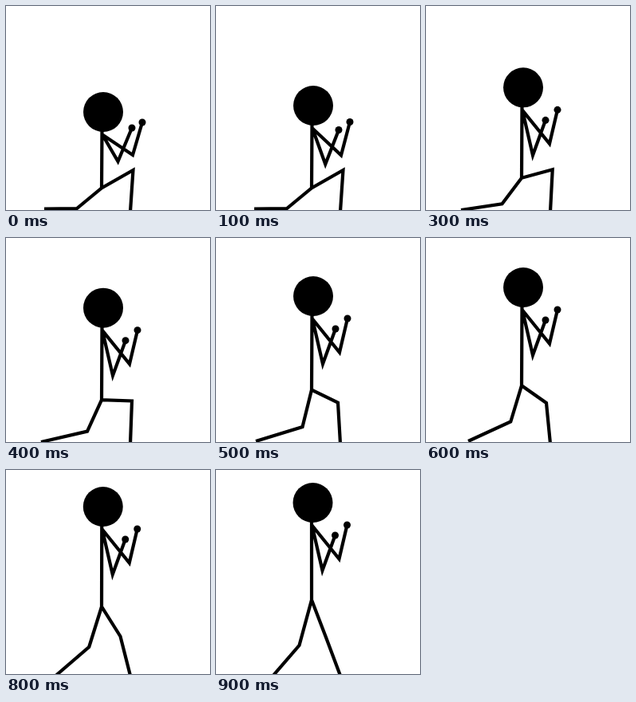
Recreate the animation shown at these times as an HTML page. Size 256x256 px, loop 1 s.

```html
<!DOCTYPE html>
<html lang="en">
<head>
<meta charset="utf-8">
<title>Rising stick figure</title>
<style>
  html, body { margin: 0; width: 100%; height: 100%; overflow: hidden; background: #fff; }
  svg { display: block; width: 100vw; height: 100vh; }
  path { fill: none; stroke: #000; stroke-width: 4.2; stroke-miterlimit: 6; }
</style>
</head>
<body>
<svg viewBox="0 0 256 256">
  <path id="limbs"/>
  <circle id="head" r="25"/>
  <circle id="near" r="4.5"/>
  <circle id="far" r="4.5"/>
</svg>
<script>
const STEP = 100, STEPS = 10;

// Key points of each joint: [step, x, y], linear in between, held outside.
const joints = {
  head: [[0, 122, 133], [2, 122, 117], [5, 122, 73], [7, 122, 51], [9, 121.5, 41]],
  hip: [[2, 120, 228.5], [5, 120, 190.5], [7, 120, 180], [9, 120, 163]],
  frontKnee: [[2, 159.5, 206], [4, 158, 204.5], [5, 153, 206.5], [7, 149, 207.5], [9, 138, 210]],
  backKnee: [[2, 89, 254], [5, 108.5, 237], [7, 104, 224], [9, 104.5, 220]],
  backFoot: [[2, 48, 254.5], [3, 44, 256], [4, 44, 256], [5, 50, 255], [7, 56, 255], [9, 70, 260]]
};

// Arm joints, relative to the head: raised at first, then on guard.
const arms = {
  nearElbow: [[0, 37, 54], [2, 33, 70.5]],
  nearHand: [[0, 49, 13], [2, 43, 28]],
  farElbow: [[0, 18.5, 62], [2, 12, 85]],
  farHand: [[0, 36, 20], [2, 28, 41]]
};

const $ = id => document.getElementById(id);
const add = (a, b) => [a[0] + b[0], a[1] + b[1]];

function at(keys, step) {
  const i = keys.findIndex(k => k[0] >= step);
  if (i < 0) return keys[keys.length - 1].slice(1);
  const a = keys[Math.max(0, i - 1)], b = keys[i];
  const k = a === b ? 1 : (step - a[0]) / (b[0] - a[0]);
  return [1, 2].map(n => a[n] + (b[n] - a[n]) * k);
}

function place(id, [x, y]) {
  $(id).setAttribute("cx", x);
  $(id).setAttribute("cy", y);
}

function render(step) {
  const p = {};
  for (const name in joints) p[name] = at(joints[name], step);
  for (const name in arms) p[name] = add(p.head, at(arms[name], step));
  const neck = add(p.head, [-1.5, 20]);
  const shoulder = add(p.head, [-1, 28.5]);

  const lines = [
    [neck, p.hip],
    [p.backFoot, p.backKnee, p.hip, p.frontKnee, [156, 258]],
    [shoulder, p.nearElbow, p.nearHand],
    [shoulder, p.farElbow, p.farHand]
  ];
  $("limbs").setAttribute("d", lines.map(l => "M" + l.join(" ")).join(""));
  place("head", p.head);
  place("near", p.nearHand);
  place("far", p.farHand);
}

const start = performance.now();
function tick(now) {
  render(Math.floor(Math.max(0, now - start) / STEP) % STEPS);
  requestAnimationFrame(tick);
}
render(0);
requestAnimationFrame(tick);
</script>
</body>
</html>
```
